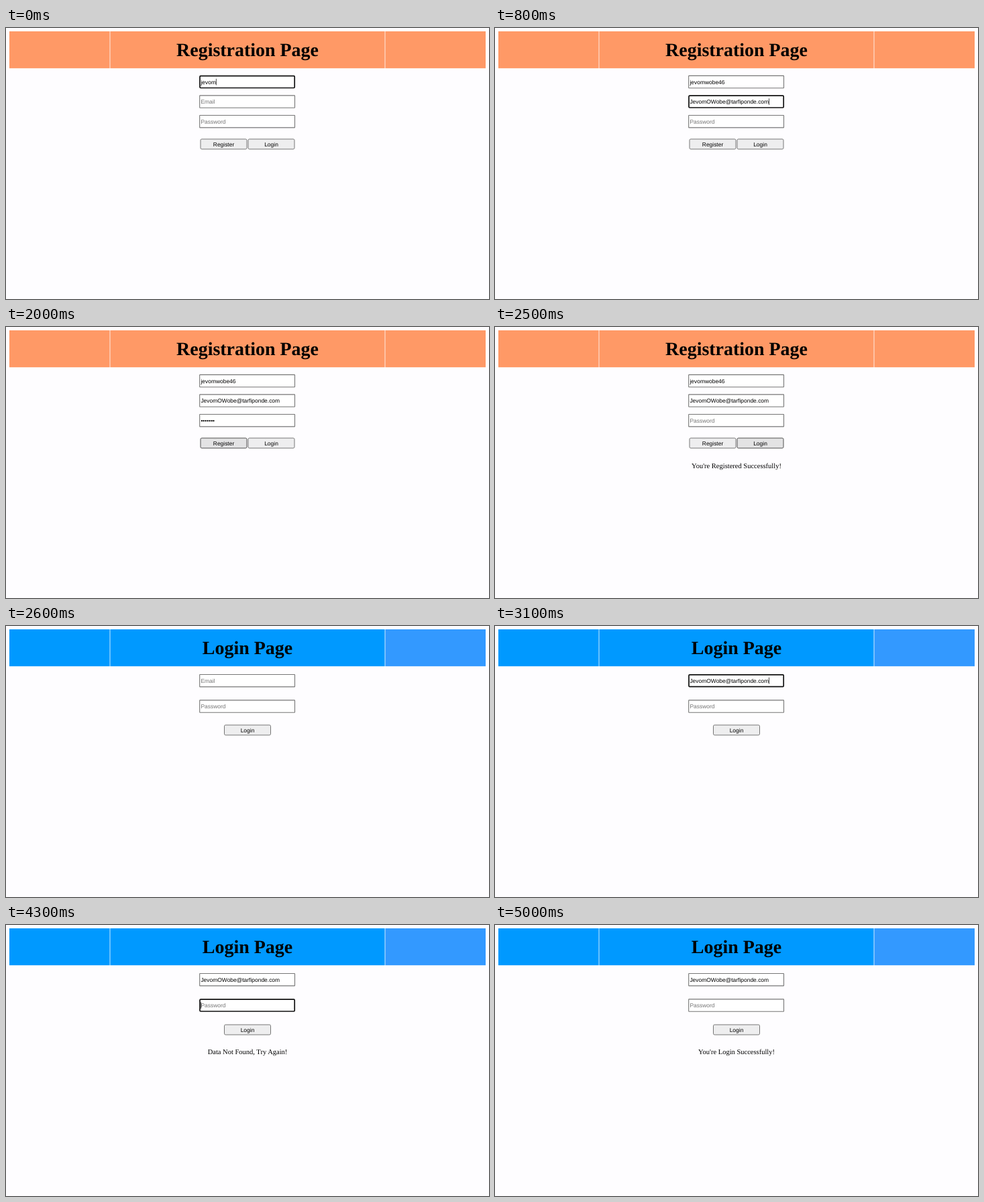
These frames come from a looping animation (720x405 px, 5.4 s). An HTML page with a canvas:

```html
<!DOCTYPE html>
<html lang="en">
<head>
<meta charset="utf-8">
<title>Registration and login</title>
<style>
  html, body { margin: 0; width: 100%; height: 100%; overflow: hidden; background: #fefdff; }
  canvas { display: block; }
</style>
</head>
<body>
<canvas id="stage" width="720" height="405"></canvas>
<script>
const ctx = document.getElementById('stage').getContext('2d');
const LOOP = 5400;
const USER = 'jevomwobe46';
const EMAIL = 'JevomOWobe@tarfiponde.com';
const SANS = '8.45px "Liberation Sans", Arial, sans-serif';
const SERIF = '"Liberation Serif", "Times New Roman", serif';

const START = { page: 'register', user: 5, email: '', dots: 0, focus: 'user', hover: '', msg: '' };

// Each step changes part of the state from its time on.
const STEPS = [
  [100, { user: 6 }],
  [200, { user: 7 }],
  [300, { user: 9 }],
  [400, { user: 10 }],
  [500, { user: 11 }],
  [600, { focus: 'email' }],
  [700, { email: EMAIL }],
  [1000, { focus: 'password' }],
  [1100, { dots: 2 }],
  [1200, { dots: 4 }],
  [1300, { dots: 6 }],
  [1400, { dots: 7 }],
  [1700, { hover: 'Register' }],
  [2000, { focus: '' }],
  [2100, { dots: 0, msg: "You're Registered Successfully!" }],
  [2300, { hover: 'Login' }],
  [2600, { page: 'login', email: '', hover: '', msg: '' }],
  [2800, { focus: 'email' }],
  [3100, { email: EMAIL }],
  [3200, { focus: 'password' }],
  [3300, { dots: 1 }],
  [3400, { dots: 2 }],
  [3500, { dots: 3 }],
  [3700, { focus: '', hover: 'Login' }],
  [3800, { dots: 0, hover: '', msg: 'Data Not Found, Try Again!' }],
  [4100, { focus: 'password' }],
  [4400, { dots: 2 }],
  [4500, { dots: 5 }],
  [4600, { dots: 7 }],
  [4700, { hover: 'Login' }],
  [4800, { focus: '' }],
  [4900, { dots: 0, hover: '', msg: "You're Login Successfully!" }]
];

function stateAt(time) {
  const state = { ...START };
  for (const [at, change] of STEPS) {
    if (at <= time) Object.assign(state, change);
  }
  return state;
}

function text(str, x, y, font, color, align = 'left') {
  ctx.font = font;
  ctx.fillStyle = color;
  ctx.textAlign = align;
  ctx.fillText(str, x, y);
}

function box(x, y, w, h, radius, fill, stroke, line) {
  ctx.beginPath();
  ctx.roundRect(x, y, w, h, radius);
  ctx.fillStyle = fill;
  ctx.fill();
  ctx.strokeStyle = stroke;
  ctx.lineWidth = line;
  ctx.stroke();
}

function header(title, main, right) {
  ctx.fillStyle = '#fff';
  ctx.fillRect(4.5, 4.5, 711, 56);
  ctx.fillStyle = main;
  ctx.fillRect(5, 5, 149.6, 55.2);
  ctx.fillRect(155.4, 5, 409.2, 55.2);
  ctx.fillStyle = right;
  ctx.fillRect(565.4, 5, 149.6, 55.2);
  text(title, 360, 42, `bold 27.95px ${SERIF}`, '#000', 'center');
}

function field(mid, value, hint, focused) {
  if (focused) box(289, mid - 8.9, 141.2, 17.8, 1.2, '#fff', '#101010', 1.7);
  else box(288.7, mid - 9.2, 141.8, 18.4, 0.5, '#fff', '#767676', 1.1);
  text(value || hint, 290.4, mid + 3, SANS, value ? '#000' : '#757575');
  if (focused) {
    const end = 290.4 + (value ? ctx.measureText(value).width : 0);
    ctx.fillStyle = '#000';
    ctx.fillRect(end, mid - 4.8, 0.7, 9.6);
  }
}

function button(label, x, mid, hovered) {
  box(x + 0.5, mid - 7.5, 69, 15, 1.8,
    hovered ? '#e3e3e4' : '#eeeeef', hovered ? '#4f4f4f' : '#767676', 1);
  text(label, x + 35, mid + 3, SANS, '#000', 'center');
}

function message(str, y) {
  text(str, 360, y, `10.5px ${SERIF}`, '#000', 'center');
}

function draw(time) {
  const s = stateAt(time);
  const dots = '\u2022'.repeat(s.dots);
  ctx.fillStyle = '#fefdff';
  ctx.fillRect(0, 0, 720, 405);

  if (s.page === 'register') {
    header('Registration Page', '#ff9966', '#ff9966');
    field(80.6, USER.slice(0, s.user), 'Username', s.focus === 'user');
    field(110.1, s.email, 'Email', s.focus === 'email');
    field(139.7, dots, 'Password', s.focus === 'password');
    button('Register', 289.5, 173.5, s.hover === 'Register');
    button('Login', 360.5, 173.5, s.hover === 'Login');
    message(s.msg, 210.5);
  } else {
    header('Login Page', '#0099ff', '#3399ff');
    field(81.7, s.email, 'Email', s.focus === 'email');
    field(120.1, dots, 'Password', s.focus === 'password');
    button('Login', 325, s.msg ? 156.5 : 155.5, s.hover === 'Login');
    message(s.msg, 193);
  }
}

ctx.textRendering = 'geometricPrecision';
const begin = performance.now();
function tick() {
  draw((performance.now() - begin) % LOOP);
  requestAnimationFrame(tick);
}
tick();
</script>
</body>
</html>
```
